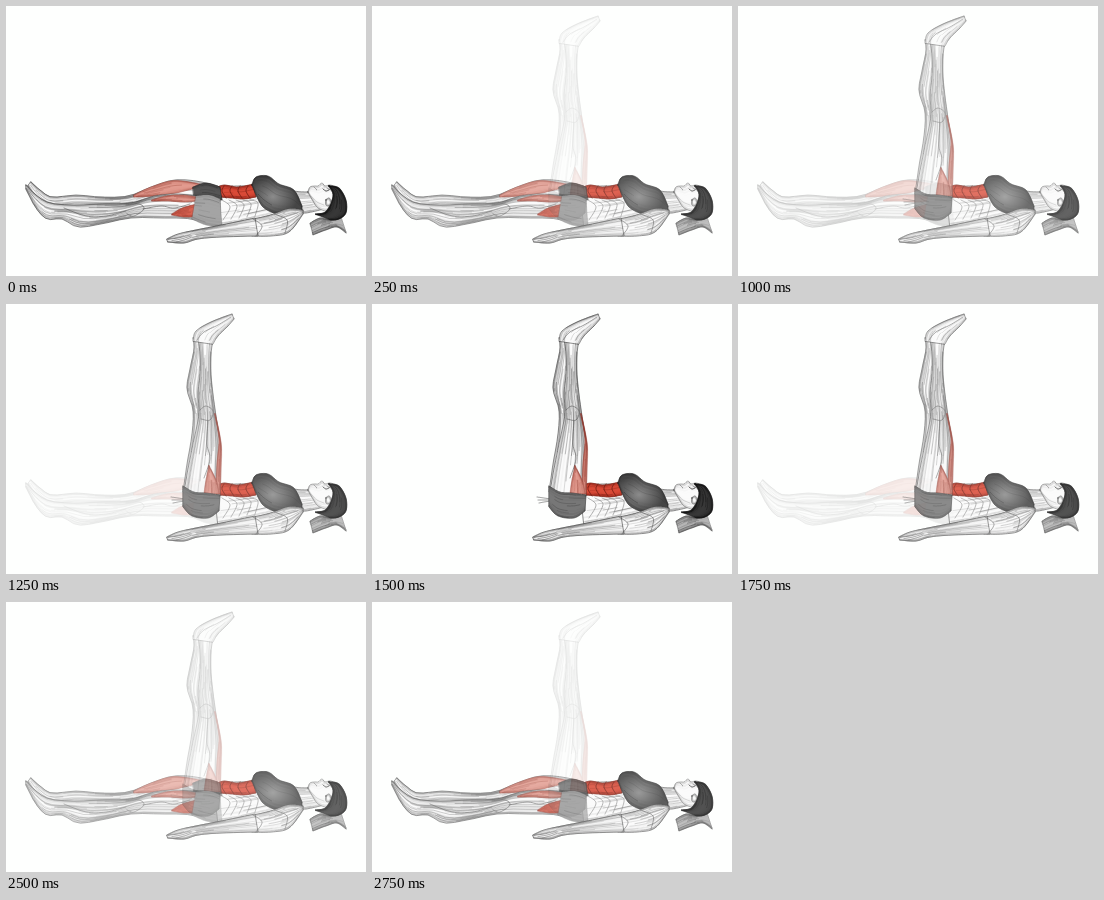
An HTML page for the animation above (3000 ms loop, 360x270 px).

```html
<!DOCTYPE html>
<html lang="en">
<head>
<meta charset="utf-8">
<title>Lying leg raise</title>
<style>
html, body { margin: 0; width: 100%; height: 100%; overflow: hidden; background: #fefffe; }
svg { display: block; width: 100%; height: 100%; }
path { stroke-linejoin: round; stroke-linecap: round; }
</style>
</head>
<body>
<svg id="stage" viewBox="0 0 360 270"></svg>
<script>
const stage = document.getElementById('stage');

let seed = 7;
const random = () => (seed = seed * 16807 % 2147483647) / 2147483647;
const range = (count, make) => Array.from({ length: count }, (_, i) => make(i));
const mix = (a, b, k) => a + (b - a) * k;

const path = (d, fill, line, width, opacity = 1) =>
  `<path d="${d}" fill="${fill}" stroke="${line}" stroke-width="${width}" stroke-opacity="${opacity}"/>`;
const polyline = points => 'M' + points.map(p => p.map(v => v.toFixed(1)).join(' ')).join('L');

// Smooth curve through key points, as a function of u from 0 to 1.
function spline(keys) {
  const points = keys.split(' ').map(pair => pair.split(',').map(Number));
  const last = points.length - 1;
  return u => {
    const i = Math.min(Math.floor(u * last), last - 1);
    const t = u * last - i;
    const [a, b, c, d] = [i - 1, i, i + 1, i + 2].map(j => points[Math.max(0, Math.min(last, j))]);
    return [0, 1].map(n => b[n] + t / 2 * (c[n] - a[n] +
      t * (2 * a[n] - 5 * b[n] + 4 * c[n] - d[n] + t * (3 * (b[n] - c[n]) + d[n] - a[n]))));
  };
}

const trace = (curve, from = 0, to = 1, steps = 24) =>
  range(steps + 1, i => curve(mix(from, to, i / steps)));
const line = (keys, color = '#555', width = 0.6) =>
  path(polyline(trace(spline(keys))), 'none', color, width);

// A form between two edges: soft shade towards the edges, then sketched strands.
function form(top, bottom, { fill = '#fbfbfb', ink = '#444', strands = 12, shade = 0.4, outline = 0.8 } = {}) {
  const edges = [spline(top), spline(bottom)];
  const between = v => u => {
    const [a, b] = edges.map(edge => edge(u));
    return [mix(a[0], b[0], v), mix(a[1], b[1], v)];
  };
  const contour = polyline([...trace(edges[0]), ...trace(edges[1]).reverse()]) + 'Z';
  const bands = range(9, i => {
    const v = (i + 0.5) / 9;
    return path(polyline(trace(between(v))), 'none', ink, 1.8, shade * Math.abs(2 * v - 1) ** 3);
  });
  const sketch = range(strands, i => {
    const start = random() * 0.6;
    const strand = trace(between((i + random()) / strands), start, Math.min(1, start + 0.2 + random() * 0.4), 12);
    return path(polyline(strand), 'none', ink, 0.5, 0.25 + random() * 0.5);
  });
  return path(contour, fill, 'none', 0) + bands.join('') + sketch.join('') +
    path(contour, 'none', ink, outline, 0.75);
}

const salmon = { fill: '#e29b8f', ink: '#8c3429', strands: 9, shade: 0.3, outline: 0.5 };
const red = { fill: '#da4a37', ink: '#70190f', strands: 6, shade: 0.5 };
const darkCloth = { fill: '#555', ink: '#222', strands: 4 };
const paleCloth = { fill: '#a4a4a4', ink: '#555', strands: 6, shade: 0.2, outline: 0.4 };

const defs = `<defs><radialGradient id="sheen" cx=".42" cy=".55" r=".5">
  <stop stop-color="#8b8b8b"/><stop offset="1" stop-color="#454545"/></radialGradient></defs>`;

const head =
  form('274,180 288,185 304,186', '286,207 300,207 318,203') +
  form('334,209 324,213 314,212 304,217', '340,227 331,221 320,224 307,229',
    { fill: '#b5b5b5', ink: '#222', strands: 16, outline: 0.5 }) +
  form('302,186 304,181 309,180 312,180 316,177 319,180 325,179 333,184', '302,186 307,195 311,201 316,204 321,205 326,203 330,199 333,190',
    { strands: 0, shade: 0.25, outline: 0.6 }) +
  form('323,180 333,182 340,194 340,207 333,213 325,214', '323,180 327,188 325,197 321,204 317,207 309,208',
    { fill: '#383838', ink: '#0c0c0c', strands: 10, shade: 0.7 }) +
  form('320,194 323,192 325,195', '320,194 320,199 323,200', { strands: 0, outline: 0.5 }) +
  line('317,183 320,185 323,184', '#222', 0.9) + line('321,182 324,184', '#333') +
  line('308,181 310,183 311,184') + line('305,190 311,196 318,199', '#aaa');

const torso =
  form('208,181 230,180 250,180', '212,220 240,215 272,207', { strands: 16, shade: 0.25 }) +
  range(5, i => line(`${216 + 7 * i},194 ${224 + 7 * i},${201 - i} ${217 + 8 * i},${214 - i}`, '#777')).join('') +
  form('209,182 218,179 232,181 247,178', '213,191 225,192 238,193 250,191', red) +
  range(4, i => line(`${218 + 8 * i},180 ${216 + 8 * i},185 ${220 + 8 * i},192`, '#701c12', 0.9)).join('') +
  form('246,179 250,171 262,170 273,178 288,184 296,200', '246,179 251,191 257,201 268,207 282,208 296,204',
    { fill: 'url(#sheen)', ink: '#222', strands: 4, shade: 0.3 });

const arm =
  form('240,214 262,210 282,203 297,204', '246,230 265,230 283,226 297,208', { strands: 18 }) +
  form('161,233 172,228 190,224 215,219 249,212', '162,236 178,237 192,233 215,231 252,230', { strands: 16 }) +
  line('247,213 256,220 250,230') + line('268,208 281,214 279,227') +
  range(3, i => line(`${162 + 4 * i},${233 + 1.5 * i} ${172 + 3 * i},${232 + i} ${184 + i},${229 + i}`)).join('');

const legsDown =
  form('25,176 34,184 46,191 70,189 95,191 122,190 145,181 168,174 190,175 212,180',
    '22,180 32,196 46,204 70,204 95,203 122,202 145,200 168,198 190,198 212,198', { strands: 26, shade: 0.45 }) +
  form('128,189 145,181 168,174.5 194,178', '128,191 150,190 170,187 194,181', salmon) +
  form('187,181 200,177 214,181', '188,191 200,191 216,194', darkCloth) +
  form('20,179 30,189 44,197 68,199 95,198 125,197 148,190 170,188 190,190 214,193',
    '20,183 30,202 41,213 56,213 72,221 95,218 125,212 155,212 185,213 214,221', { strands: 34, shade: 0.45 }) +
  form('146,194 160,190 176,189 190,191', '146,195 162,195 178,196 190,195', salmon) +
  form('166,208 176,202 190,198', '166,209 178,211 187,211', { ...salmon, fill: '#d96452' }) +
  form('190,190 203,189 214,193', '186,213 200,219 216,221', paleCloth) +
  line('120,199 133,198 138,203 128,210 121,208') + line('137,203 155,200 168,202 184,198') +
  line('58,202 80,210 100,210 120,205');

const legsUp =
  range(3, i => line(`${165 + i},${193 + 3 * i} 172,${194 + 2 * i} 180,${195 + i}`)).join('') +
  form('187,34 188,45 184,65 181,85 187,106 186,130 181,160 177,188',
    '195,34 197,50 196,70 194,90 195,110 200,140 200,165 200,188', { strands: 24 }) +
  form('192,34 194,50 194,70 192,90 193,110 187,140 182,165 178,188',
    '207,36 205,50 205,70 207,90 210,112 214,140 214,165 214,192', { strands: 34, shade: 0.35 }) +
  form('187,37 190,27 205,18 226,10', '207,40 212,32 222,22 228,15', { strands: 9 }) +
  line('191,36 198,28 212,21 225,13') +
  line('194,106 200,102 207,107 204,116 195,115') + line('202,117 201,140 204,155 198,174') +
  form('209,110 213,135 211,160 210,190', '209,110 215,140 215,165 214,190', salmon) +
  form('203,162 200,176 198,189', '203,162 210,176 213,190', salmon) +
  form('177,182 188,188 200,189 214,191', '177,203 186,212 202,214 213,207',
    { fill: '#777', ink: '#333', strands: 8 });

const pose = (id, legs) => `<g id="${id}">${head}${torso}${legs}${arm}</g>`;
stage.innerHTML = defs + pose('lying', legsDown) + pose('raised', legsUp);
const lying = document.getElementById('lying');
const raised = document.getElementById('raised');

// Twelve equal steps: six fading to the raised pose, six fading back.
function draw(now) {
  const step = Math.floor(now % 3000 / 250);
  const lift = (6 - Math.abs(6 - step)) / 6;
  lying.setAttribute('opacity', 1 - lift);
  raised.setAttribute('opacity', lift);
  requestAnimationFrame(draw);
}
draw(performance.now());
</script>
</body>
</html>
```
